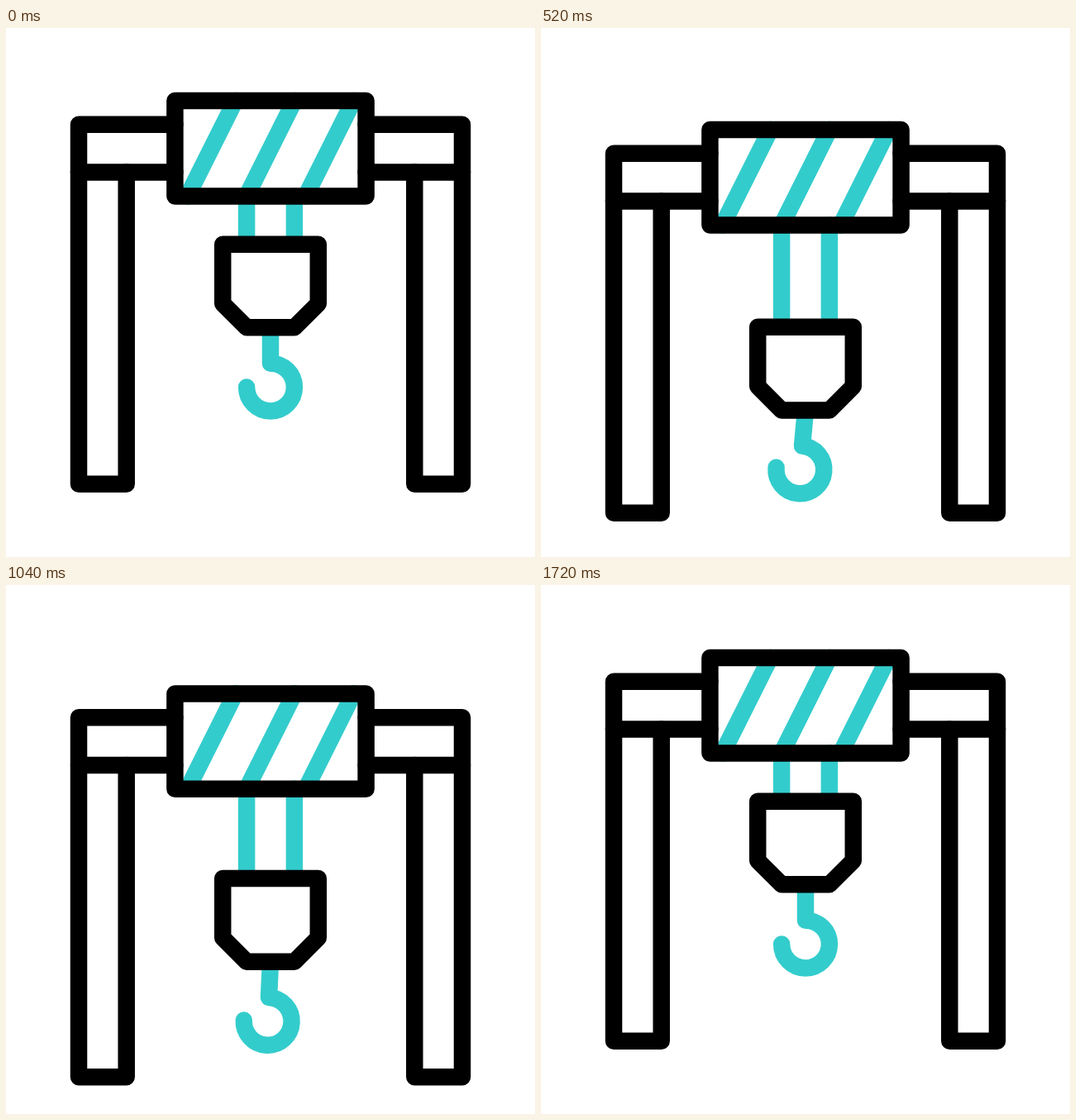
Animation, 640 px wide and 640 px high, one loop 1.8 s. Source, as an HTML page with a canvas:

```html
<!DOCTYPE html>
<html lang="en">
<head>
<meta charset="utf-8">
<title>Gantry crane</title>
<style>
html, body { margin: 0; width: 100%; height: 100%; overflow: hidden; background: #fff; }
canvas { display: block; width: 640px; height: 640px; }
</style>
</head>
<body>
<canvas id="stage" width="640" height="640"></canvas>
<script>
const ctx = document.getElementById('stage').getContext('2d');
const LOOP = 1800, STEP = 40;
const BLACK = '#000', TEAL = '#33cccc';
const CENTER = 320, UNIT = 57.8;
const BEAM_Y = 116.8, RAIL_Y = 174.5, FOOT_Y = 551.8;
const DRUM_TOP = 88, DRUM_BOTTOM = 203.4;
const BLOCK_TOP = 261.7, BLOCK_BOTTOM = 362.3;
const SWING_BEAT = 355, SWING = [0, 15, -10.2, 2.7, -1, 0];

// cubic-bezier(.7, 0, .3, 1), solved by bisection
function ease(x) {
  if (x <= 0 || x >= 1) return x <= 0 ? 0 : 1;
  let low = 0, high = 1, s;
  for (let i = 0; i < 24; i++) {
    s = (low + high) / 2;
    const at = 2.1 * s * (1 - s) ** 2 + 0.9 * s * s * (1 - s) + s ** 3;
    if (at < x) low = s; else high = s;
  }
  return s * s * (3 - 2 * s);
}

const progress = (t, start, end) => ease((t - start) / (end - start));
const frameDrop = t => 46.6 * (progress(t, 0, 880) - progress(t, 800, 1720));
const cableLength = t => 68.7 * (progress(t, 0, 680) - progress(t, 735, 1460));

function hookAngle(t) {
  const beat = Math.floor(t / SWING_BEAT);
  const from = SWING[beat], to = SWING[beat + 1] ?? 0;
  return from + (to - from) * ease(t / SWING_BEAT - beat);
}

function stroke(color, points, closed, fill) {
  ctx.beginPath();
  points.forEach(([x, y]) => ctx.lineTo(x, y));
  if (closed) ctx.closePath();
  if (fill) {
    ctx.fillStyle = fill;
    ctx.fill();
  }
  ctx.strokeStyle = color;
  ctx.stroke();
}

function drawHook(angle) {
  const radius = UNIT / 2;
  ctx.save();
  ctx.translate(CENTER, BLOCK_BOTTOM);
  ctx.rotate(angle * Math.PI / 180);
  ctx.beginPath();
  ctx.moveTo(0, 0);
  ctx.lineTo(0, radius * 1.5);
  ctx.arc(0, radius * 2.5, radius, -Math.PI / 2, Math.PI);
  ctx.strokeStyle = TEAL;
  ctx.stroke();
  ctx.restore();
}

function drawBlock() {
  const left = CENTER - UNIT, right = CENTER + UNIT, bevel = UNIT / 2;
  stroke(BLACK, [
    [left, BLOCK_TOP], [right, BLOCK_TOP],
    [right, BLOCK_BOTTOM - bevel], [right - bevel, BLOCK_BOTTOM],
    [left + bevel, BLOCK_BOTTOM], [left, BLOCK_BOTTOM - bevel]
  ], true, '#fff');
}

function drawGantrySide(side) {
  const inner = CENTER + side * 2 * UNIT;
  const leg = CENTER + side * 174.3;
  const outer = CENTER + side * 232;
  stroke(BLACK, [[inner, BEAM_Y], [outer, BEAM_Y], [outer, FOOT_Y], [leg, FOOT_Y], [leg, RAIL_Y]]);
  stroke(BLACK, [[inner, RAIL_Y], [outer, RAIL_Y]]);
}

function drawDrum() {
  const left = CENTER - 2 * UNIT, right = CENTER + 2 * UNIT;
  for (let i = -1; i <= 1; i++) {
    const x = CENTER + i * 71.5;
    stroke(TEAL, [[x + UNIT / 2, DRUM_TOP], [x - UNIT / 2, DRUM_BOTTOM]]);
  }
  stroke(BLACK, [[left, DRUM_TOP], [right, DRUM_TOP], [right, DRUM_BOTTOM], [left, DRUM_BOTTOM]], true);
}

function draw(t) {
  const cable = cableLength(t);
  ctx.clearRect(0, 0, 640, 640);
  ctx.lineWidth = 20.5;
  ctx.lineCap = ctx.lineJoin = 'round';
  ctx.save();
  ctx.translate(0, frameDrop(t));

  for (const side of [-1, 1]) {
    const x = CENTER + side * UNIT / 2;
    stroke(TEAL, [[x, DRUM_BOTTOM], [x, BLOCK_TOP + cable]]);
  }

  ctx.save();
  ctx.translate(0, cable);
  drawHook(hookAngle(t));
  drawBlock();
  ctx.restore();

  drawGantrySide(-1);
  drawGantrySide(1);
  drawDrum();
  ctx.restore();
}

function tick() {
  const t = performance.now() % LOOP;
  draw(Math.floor(t / STEP) * STEP);
  requestAnimationFrame(tick);
}
tick();
</script>
</body>
</html>
```
